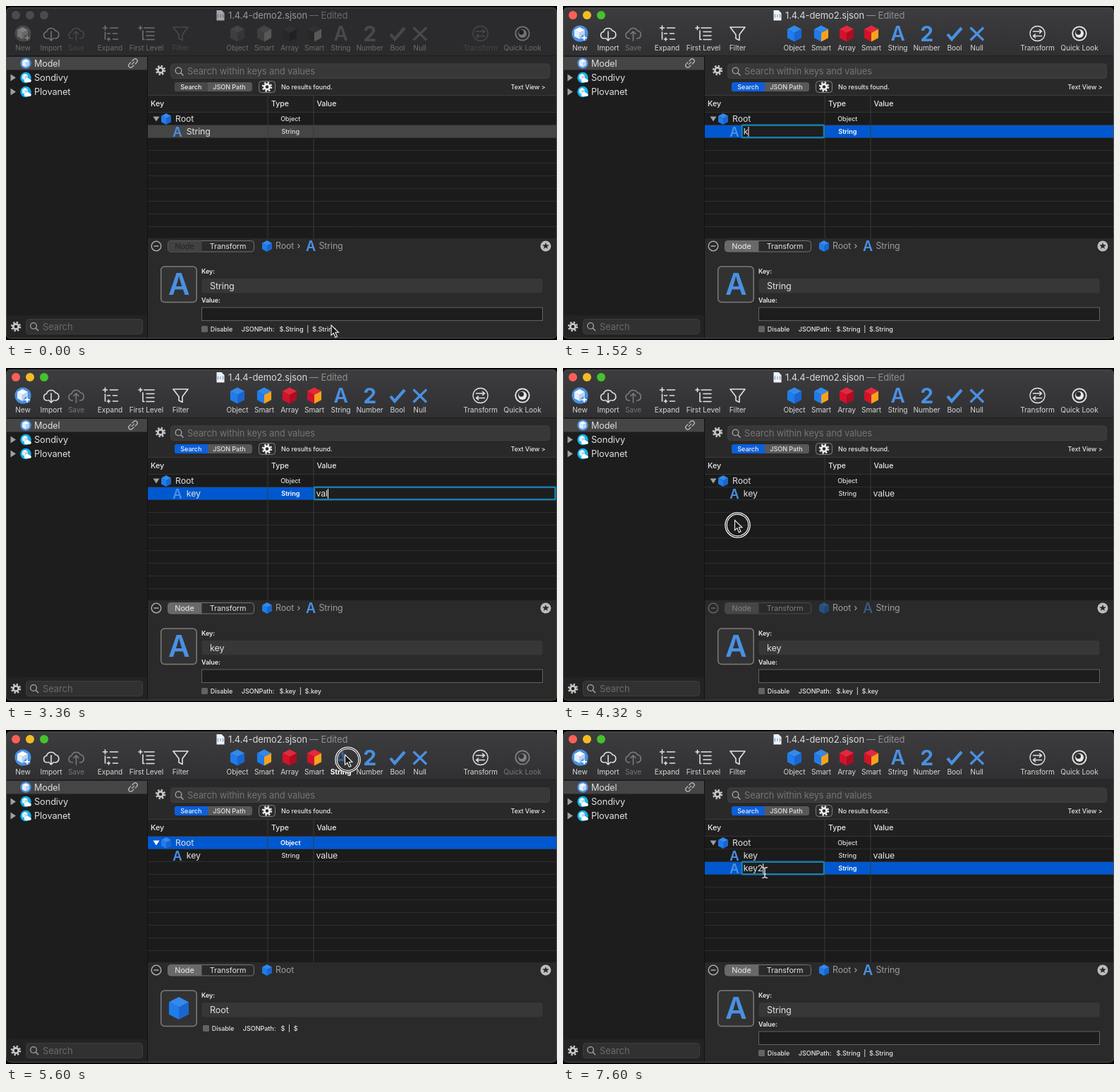
These frames come from a looping animation (781x473 px, 8 s). An HTML page:

```html
<!DOCTYPE html>
<html lang="en">
<head>
<meta charset="utf-8">
<title>JSON editor</title>
<style>
html, body { margin: 0; width: 100%; height: 100%; overflow: hidden; background: #000; }
svg { display: block; }
text { font-family: Inter, "Open Sans", sans-serif; letter-spacing: -.008em; white-space: pre; }
.line { fill: none; stroke: #e2e2e2; stroke-width: 1.6; stroke-linecap: round; stroke-linejoin: round; }
.off { opacity: .4; }
.pressed g { opacity: .5; }
.pressed > text { font-weight: 700; fill: #fff; }
.idle #tools { filter: grayscale(1) brightness(.62); opacity: .72; }
.idle .light { fill: #4b4b4d; }
.idle #title { opacity: .62; }
.idle #bar { fill: #2b2b2d; }
.idle #searchTab { fill: #484848; }
.idle #nodeTab { fill: #424242; }
.idle #nodeText { fill: #222; }
</style>
</head>
<body>
<svg id="stage" width="781" height="473" viewBox="0 0 781 473"></svg>
<script>
const LOOP = 8000, TICK = 80;
const BLUE = '#4a90e2', SELECT = '#0058d0';
const stage = document.getElementById('stage');

// Markup helpers
const text = (x, y, str, size = 12.3, fill = '#dedede', more = '') =>
  `<text x="${x}" y="${y}" font-size="${size}" fill="${fill}" ${more}>${str}</text>`;
const mid = 'text-anchor="middle"', medium = 'font-weight="500"', bold = 'font-weight="600"';
const rect = (x, y, w, h, fill, more = '') =>
  `<rect x="${x}" y="${y}" width="${w}" height="${h}" fill="${fill}" ${more}/>`;
const circle = (x, y, r, fill, more = '') => `<circle cx="${x}" cy="${y}" r="${r}" fill="${fill}" ${more}/>`;
const at = (x, y, body) => `<g transform="translate(${x} ${y})">${body}</g>`;
const line = (d, more = '') => `<path class="line" d="${d}" ${more}/>`;
const group = (id, body) => `<g id="${id}">${body}</g>`;

const blueFaces = ['#1f7cec', '#3389ec', '#1a66cf'];
const whiteFaces = ['#e4eefb', '#ffffff', '#bcd4f2'];
const cube = (x, y, r, [left, top, right] = blueFaces) => `<g transform="translate(${x} ${y}) scale(${r / 12})">
  <path fill="${top}" d="M0-12 10.5-6.5 0-1-10.5-6.5Z"/>
  <path fill="${left}" d="M-10.5-6.5 0-1V12L-10.5 6.5Z"/>
  <path fill="${right}" d="M10.5-6.5 0-1V12L10.5 6.5Z"/></g>`;
const letterA = (x, y, size) => text(x, y, 'A', size, BLUE, `${mid} ${bold}`);
const gear = (x, y, color = '#c8c8c8') => at(x, y,
  circle(0, 0, 3.7, 'none', `stroke="${color}" stroke-width="2.8"`) +
  circle(0, 0, 6, 'none', `stroke="${color}" stroke-width="2.4" stroke-dasharray="2.356"`));
const lens = (x, y) => at(x, y, circle(-1, -1, 4.3, 'none', 'stroke="#a6a6a6" stroke-width="1.3"') +
  '<path d="M2.2 2.2 6 6" stroke="#a6a6a6" stroke-width="1.5"/>');
const tool = (x, label, icon, id = '', cls = '') =>
  `<g id="${id}" class="${cls}">${at(x, 39, icon)}${text(x, 63.4, label, 10.2, '#d6d6d6', mid)}</g>`;

const cloud = 'M-5 7H-6A4.8 4.8 0 0 1-6.5-2.5 6.8 6.8 0 0 1 6-4 5.6 5.6 0 0 1 6.5 7H5';
const tools = [
  tool(24, 'New', circle(0, 0, 11.5, BLUE) + cube(-.5, -.5, 8.5, whiteFaces) +
    circle(6, 6, 4.6, BLUE) + '<path d="M6 2.5V9.5M2.5 6H9.5" stroke="#fff" stroke-width="1.8"/>'),
  tool(64, 'Import', line(cloud) + line('M0-3V10M-3.5 6.5 0 10 3.5 6.5')),
  tool(99.5, 'Save', line(cloud) + line('M0 10V-3M-3.5 .5 0-3 3.5 .5'), '', 'off'),
  tool(147.5, 'Expand', line('M-10-8H-4M-7-11V-5M0-8H11M-4 0H0M4 0H10M-4 8H0M-2 6V10M4 8H11M-7-2V8')),
  tool(199, 'First Level', line('M-11-8H-6M-8.5-10.5V-5.5M-3-8H11M0-2.5H11M0 3H11M0 8.5H11M-5-4V8.5H-3')),
  tool(247.5, 'Filter', line('M-10.5-9H10.5L2.5 1.5V9.5L-2.5 7V1.5Z'), 'filter'),
  tool(328, 'Object', cube(0, 0, 11.5)),
  tool(366, 'Smart', cube(0, 0, 11.5, ['#1f7cec', '#3389ec', '#f6a21c'])),
  tool(402, 'Array', cube(0, 0, 11.5, ['#d3122b', '#e6283c', '#ad0d22'])),
  tool(437, 'Smart', cube(0, 0, 11.5, ['#d3122b', '#e6283c', '#f6a21c'])),
  tool(474.5, 'String', letterA(0, 10.3, 28), 'stringTool'),
  tool(515.5, 'Number', text(0, 11, '2', 30, BLUE, `${mid} font-weight="700"`)),
  tool(555, 'Bool', `<path d="M-10 1-4 8 10-8" fill="none" stroke="${BLUE}" stroke-width="4.2"/>`),
  tool(586.5, 'Null', `<path d="M-9-8.5 9.5 9.5M9.5-8.5-9 9.5" stroke="${BLUE}" stroke-width="3.2"/>`),
  tool(672.5, 'Transform', circle(0, 0, 10.5, 'none', 'stroke="#e2e2e2" stroke-width="1.3"') +
    line('M-6-3H6M3-5.5 6-3 3-.5M6 3.5H-6M-3 1-6 3.5-3 6', 'stroke-width="1.2"'), 'transform'),
  tool(732, 'Quick Look', circle(0, 0, 9.7, 'none', 'stroke="#e8e8e8" stroke-width="1.8"') +
    circle(0, 0, 6, '#e8e8e8') + circle(-1.5, -1.7, 3.5, '#2c2c2e'), 'quick')
].join('');

const title = [['#ff5f57', 14], ['#f4bc22', 34], ['#45c22c', 54]]
  .map(([c, x]) => circle(x, 13, 6, c, 'class="light"')).join('') + group('title',
  '<path d="M298.5 6H305.5L309.5 10V20.5H298.5Z" fill="#f2f2f2"/>' +
  '<path d="M301 11.5 300 14 301 16.5M307 11.5 308 14 307 16.5M304 12V16" fill="none" stroke="#4a90e2"/>' +
  text(315, 17.8, '1.4.4-demo2.sjson', 13, '#dadada') + text(430, 17.8, '— Edited', 13, '#8f8f8f'));

const remote = (y, name) => `<path d="M6.5 ${y - 5}V${y + 5}L14 ${y}Z" fill="#a0a0a0"/>` +
  circle(28, y, 7.7, '#12b4ec') + cube(27, y - 1, 4.6, whiteFaces) +
  `<path d="M27 ${y + 6.5}a2.5 2.5 0 0 1 .5-4.5 3 3 0 0 1 5.5 0 2.3 2.3 0 0 1 1 4.5Z" fill="#fff"/>` +
  text(40, y + 4.8, name, 12.8);

const sidebar = rect(1, 71, 199, 399, '#1d1d1d') + rect(1, 72, 199, 18.5, '#454545') +
  circle(28, 81, 7.7, BLUE) + cube(28, 81, 5.8, whiteFaces) + text(40, 85.8, 'Model', 12.6) +
  at(180, 81, `<g transform="rotate(-45)" fill="none" stroke="#b0b0b0" stroke-width="1.4">
    <path d="M1-3H4.5a3 3 0 0 1 0 6H1M-1 3H-4.5a3 3 0 0 1 0-6H-1M-3 0H3"/></g>`) +
  remote(101.5, 'Sondivy') + remote(121.5, 'Plovanet') +
  rect(1, 438, 199, 32, '#232323') + gear(14, 454) +
  rect(28.5, 443.5, 165, 21, '#313131', 'rx="4" stroke="#3d3d3d"') + lens(40, 454) +
  text(52, 458.8, 'Search', 13, '#6a6a6a');

const search = rect(201, 71, 579, 56, '#292929') + gear(219, 91) +
  rect(233.5, 82, 537, 20.5, '#383838', 'rx="4" stroke="#404040"') + lens(245.5, 92.5) +
  text(257, 97, 'Search within keys and values', 12.9, '#747474') +
  rect(239, 108, 110, 13, '#585858', 'rx="3.5"') +
  '<path id="searchTab" d="M242.5 108H286V121H242.5a3.5 3.5 0 0 1-3.5-3.5V111.5a3.5 3.5 0 0 1 3.5-3.5Z" fill="#0b5fdc"/>' +
  text(262.3, 117.8, 'Search', 9.1, '#f2f2f2', `${mid} ${medium}`) +
  text(316.5, 117.8, 'JSON Path', 9.1, '#e2e2e2', `${mid} ${medium}`) +
  rect(358.5, 106.5, 23, 16, '#2c2c2c', 'rx="4" stroke="#808080"') + gear(370, 114.5, '#eee') +
  text(390, 118, 'No results found.', 9, '#e6e6e6', medium) +
  text(764.5, 118, 'Text View &gt;', 8.9, '#e6e6e6', `text-anchor="end" ${medium}`);

const rowTop = i => 151 + 18 * i;
const typeText = (i, name) => text(403.3, rowTop(i) + 12.4, name, 9.1, '#e2e2e2', `${mid} ${medium} id="type${i}"`);
let rules = '';
for (let y = 168.5; y < 329; y += 18) rules += `M201 ${y}H780`;
const table = rect(201, 127, 579, 23.5, '#202020') + rect(201, 150, 579, 179, '#1b1b1b') +
  rect(201, 126, 579, 1, '#3a3a3a') + rect(201, 150, 579, 1, '#343434') +
  text(205, 142.3, 'Key', 10.8, '#e8e8e8', medium) + text(376, 142.3, 'Type', 10.6, '#e8e8e8', medium) +
  text(440.5, 142.3, 'Value', 10.6, '#e8e8e8', medium) +
  `<path d="${rules}" stroke="#414141" stroke-dasharray="1 1"/>` +
  '<rect id="selection" x="201" width="579" height="17.5"/>' +
  '<path d="M371 127V329M436 127V329" stroke="#3a3a3a"/>' +
  '<path id="fold" d="M208.5 156.5H217.5L213 163.5Z"/>' + cube(227, 160, 8) +
  text(240, 164.3, 'Root') + typeText(0, 'Object') +
  letterA(243, 184.8, 18.5) + typeText(1, 'String') +
  group('second', letterA(243, 202.8, 18.5) + typeText(2, 'String')) +
  group('editor', '<rect id="field" height="17.5" fill="#1e1e1e" stroke="#1a7dac" stroke-width="2.5" rx="1"/>' +
    '<rect id="highlight" height="15" fill="#47617c"/><rect id="caret" width="1" height="14" fill="#fff"/>') +
  text(255.8, 182.3, '', 12.3, '#e4e4e4', 'id="key1"') + text(439.5, 182.3, '', 12.3, '#e4e4e4', 'id="value1"') +
  text(255.8, 200.3, '', 12.3, '#e4e4e4', 'id="key2"');

const option = (x, y, id) => rect(x, y - 8, 9, 9, '#636363', 'rx="1.5"') +
  text(x + 12.8, y, 'Disable', 9, '#e4e4e4', medium) + text(x + 56.8, y, '', 9.1, '#e4e4e4', `${medium} id="${id}"`);
const panel = rect(201, 329, 579, 141, '#2a2a2a') +
  group('controls', circle(213, 340, 6.8, 'none', 'stroke="#b6b6b6" stroke-width="1.3"') +
    rect(209.5, 339.3, 7, 1.4, '#b6b6b6') + rect(229.5, 332.5, 122, 15.5, '#2a2a2a', 'rx="4" stroke="#747474"') +
    '<path id="nodeTab" d="M277.5 332.5V348H233.5a4 4 0 0 1-4-4V336.5a4 4 0 0 1 4-4Z" fill="#696969"/>' +
    text(253, 344.2, 'Node', 10.9, '#ededed', `${mid} id="nodeText"`) + text(314.5, 344.2, 'Transform', 10.8, '#e4e4e4', mid)) +
  group('crumbCube', cube(370, 340, 8)) + text(382, 344.4, 'Root', 12.4, '#9c9c9c') +
  group('crumb', text(412.5, 344, '›', 12.4, '#b4b4b4') + group('crumbA', letterA(432, 347, 19.5)) +
    text(443.5, 344.4, 'String', 12.4, '#9c9c9c')) +
  circle(765, 340, 7.5, '#bdbdbd') +
  '<path d="M765 335 766.3 338.3 769.8 338.5 767.1 340.7 768 344 765 342.1 762 344 762.9 340.7 760.2 338.5 763.7 338.3Z" fill="#2a2a2a"/>' +
  rect(219.7, 369, 50.5, 50.5, '#323232', 'rx="5" stroke="#7c7c7c" stroke-width="1.5"') +
  text(277, 379, 'Key:', 9, '#ececec', bold) + rect(277.5, 386, 483, 20.5, '#373737', 'rx="3"') +
  text(289, 401.2, '', 12.6, '#e2e2e2', 'id="panelKey"') +
  group('rootPanel', cube(245, 394, 16) + option(279, 426, 'rootPath')) +
  group('nodePanel', letterA(245, 409.3, 42) + text(277, 419.5, 'Value:', 9, '#ececec', bold) +
    rect(277.5, 427, 483, 18.5, '#1d1d1d', 'stroke="#626262"') +
    text(282, 440.6, '', 12.3, '#e2e2e2', 'id="panelValue"') + option(277, 461, 'nodePath'));

const pointer = group('pointer',
  group('ring', at(4, 7, circle(0, 0, 16.5, 'none', 'stroke="#111" stroke-width="4"') +
    circle(0, 0, 17.6, 'none', 'stroke="#fff" stroke-width="1.3"') +
    circle(0, 0, 15.3, 'none', 'stroke="#fff" stroke-width="1.2"'))) +
  group('arrow', '<path d="M0 0V14.3L3.3 11.2 5.9 17.3 8.5 16.2 5.9 10.3H10.4Z" fill="#161616" stroke="#f4f4f4" stroke-width="1.1"/>') +
  group('beam', '<path d="M-4-7.5Q0-7.5 0-5 0-7.5 4-7.5M0-6V6M-4 7.5Q0 7.5 0 5 0 7.5 4 7.5M-2 2H2" fill="none" stroke="#c9ccd0" stroke-width="1.6"/>'));

stage.innerHTML = `<defs><linearGradient id="metal" x2="0" y2="1"><stop stop-color="#3d3d3f"/><stop offset="1" stop-color="#303032"/></linearGradient>
  <clipPath id="frame"><rect y="2" width="781" height="469" rx="6"/></clipPath></defs>
  <g clip-path="url(#frame)">${rect(0, 2, 781, 469, '#111')}
  <rect id="bar" x="1" y="2" width="779" height="68.5" fill="url(#metal)"/>${title}${group('tools', tools)}
  ${sidebar}${search}${table}${panel}</g>
  <rect x=".5" y="2.5" width="780" height="468" rx="6" fill="none" stroke="#4e4e4e"/>${pointer}`;

const el = {};
stage.querySelectorAll('[id]').forEach(e => { el[e.id] = e; });

// Each step changes part of the state from its time on
const steps = [
  [0, { active: 0, ready: 0, sel: 1, grey: 1, edit: '', hl: 0, caret: 1, key1: 'String', value1: '', key2: '',
    panelKey: 'String', panelValue: '', path: 'String', disabled: 0, quick: 1, press: 0, ring: 0, cursor: 'arrow', crumb: 1 }],
  [560, { active: 1, grey: 0, ring: 1 }],
  [720, { ring: 0 }],
  [800, { ready: 1, ring: 1 }],
  [880, { ring: 0 }],
  [960, { edit: 'key1', hl: 1, cursor: 'beam' }],
  [1520, { key1: 'k', hl: 0, cursor: '' }],
  [1600, { key1: 'ke' }],
  [1760, { key1: 'key' }],
  [2320, { edit: '', grey: 1, panelKey: 'key', path: 'key', cursor: 'arrow' }],
  [2400, { edit: 'value1', grey: 0, cursor: '' }],
  [2960, { caret: 0 }],
  [3200, { caret: 1, value1: 'v' }],
  [3280, { value1: 'va' }],
  [3360, { value1: 'val' }],
  [3440, { value1: 'valu' }],
  [3600, { value1: 'value' }],
  [4000, { cursor: 'arrow' }],
  [4240, { edit: '', sel: -1, disabled: 1, ring: 1 }],
  [4400, { ring: 0, panelValue: 'value' }],
  [5040, { sel: 0, disabled: 0, quick: 0, crumb: 0, panelKey: 'Root', ring: 1 }],
  [5200, { ring: 0 }],
  [5600, { press: 1, ring: 1 }],
  [5680, { press: 0, quick: 1, sel: 2, edit: 'key2', key2: 'String', hl: 1, crumb: 1,
    panelKey: 'String', panelValue: '', path: 'String' }],
  [5760, { ring: 0 }],
  [5920, { cursor: 'beam' }],
  [6880, { key2: 'k', hl: 0 }],
  [6960, { key2: 'ke' }],
  [7200, { key2: 'key' }],
  [7600, { key2: 'key2' }]
];
const route = [[0, 461, 452], [480, 270.5, 178], [3920, 270.5, 178], [4240, 243.5, 215.5], [4720, 243.5, 215.5],
  [4960, 250, 158], [5040, 250, 158], [5440, 480.5, 35], [5600, 480.5, 35], [6000, 298, 198], [6240, 286, 202], [LOOP, 286, 202]];

const clamp = v => Math.max(0, Math.min(1, v));
function place(t) {
  const i = route.findIndex(p => p[0] > t);
  const [t0, x0, y0] = route[i - 1], [t1, x1, y1] = route[i];
  const u = (t - t0) / (t1 - t0), k = u * u * (3 - 2 * u);
  return [x0 + (x1 - x0) * k, y0 + (y1 - y0) * k];
}
const show = (id, on) => { el[id].style.display = on ? '' : 'none'; };
const fade = (id, v) => { el[id].style.opacity = v; };
const set = (id, attrs) => { for (const a in attrs) el[id].setAttribute(a, attrs[a]); };

function drawEditor(s) {
  show('editor', s.edit);
  if (!s.edit) return;
  const top = s.edit === 'key2' ? 187 : 169, wide = s.edit === 'value1';
  const x = wide ? 439.5 : 255.8, length = s[s.edit] ? el[s.edit].getComputedTextLength() : 0;
  set('field', { x: wide ? 437 : 253.5, y: top - .3, width: wide ? 341.5 : 116.5 });
  set('highlight', { x: x - .5, y: top + 1.3, width: length + .5 });
  set('caret', { x: x + length, y: top + 2 });
  show('highlight', s.hl);
  show('caret', s.caret && !s.hl);
}

function draw(t) {
  const s = Object.assign({}, ...steps.filter(([start]) => start <= t).map(([, change]) => change));
  stage.classList.toggle('idle', !s.active);
  for (const id of ['key1', 'value1', 'key2', 'panelKey', 'panelValue']) el[id].textContent = s[id];
  for (const id of ['filter', 'transform']) fade(id, s.ready ? 1 : .42);
  fade('quick', s.quick ? 1 : .42);
  el.stringTool.classList.toggle('pressed', s.press);

  show('selection', s.sel >= 0);
  set('selection', { y: rowTop(Math.max(0, s.sel)), fill: s.grey ? '#454545' : SELECT });
  for (let i = 0; i < 3; i++) {
    const lit = s.sel === i && !s.grey;
    set('type' + i, { 'font-weight': lit ? 600 : 500, fill: lit ? '#fff' : '#dcdcdc' });
  }
  set('fold', { fill: s.sel === 0 ? '#fff' : '#a0a0a0' });
  show('second', s.key2);
  drawEditor(s);

  const root = clamp((t - 5040) / 320) - clamp((t - 5680) / 380);
  fade('rootPanel', root);
  fade('nodePanel', 1 - root);
  el.rootPath.textContent = 'JSONPath:   $  |  $';
  el.nodePath.textContent = `JSONPath:   $.${s.path}  |  $.${s.path}`;
  for (const id of ['controls', 'crumbCube', 'crumbA']) fade(id, s.disabled ? .45 : 1);
  show('crumb', s.crumb);

  set('pointer', { transform: `translate(${place(t)})` });
  show('ring', s.ring);
  show('arrow', s.cursor === 'arrow');
  show('beam', s.cursor === 'beam');
}

const begin = performance.now();
function loop() {
  const t = (performance.now() - begin) % LOOP;
  draw(Math.floor(t / TICK) * TICK);
  requestAnimationFrame(loop);
}
loop();
</script>
</body>
</html>
```
